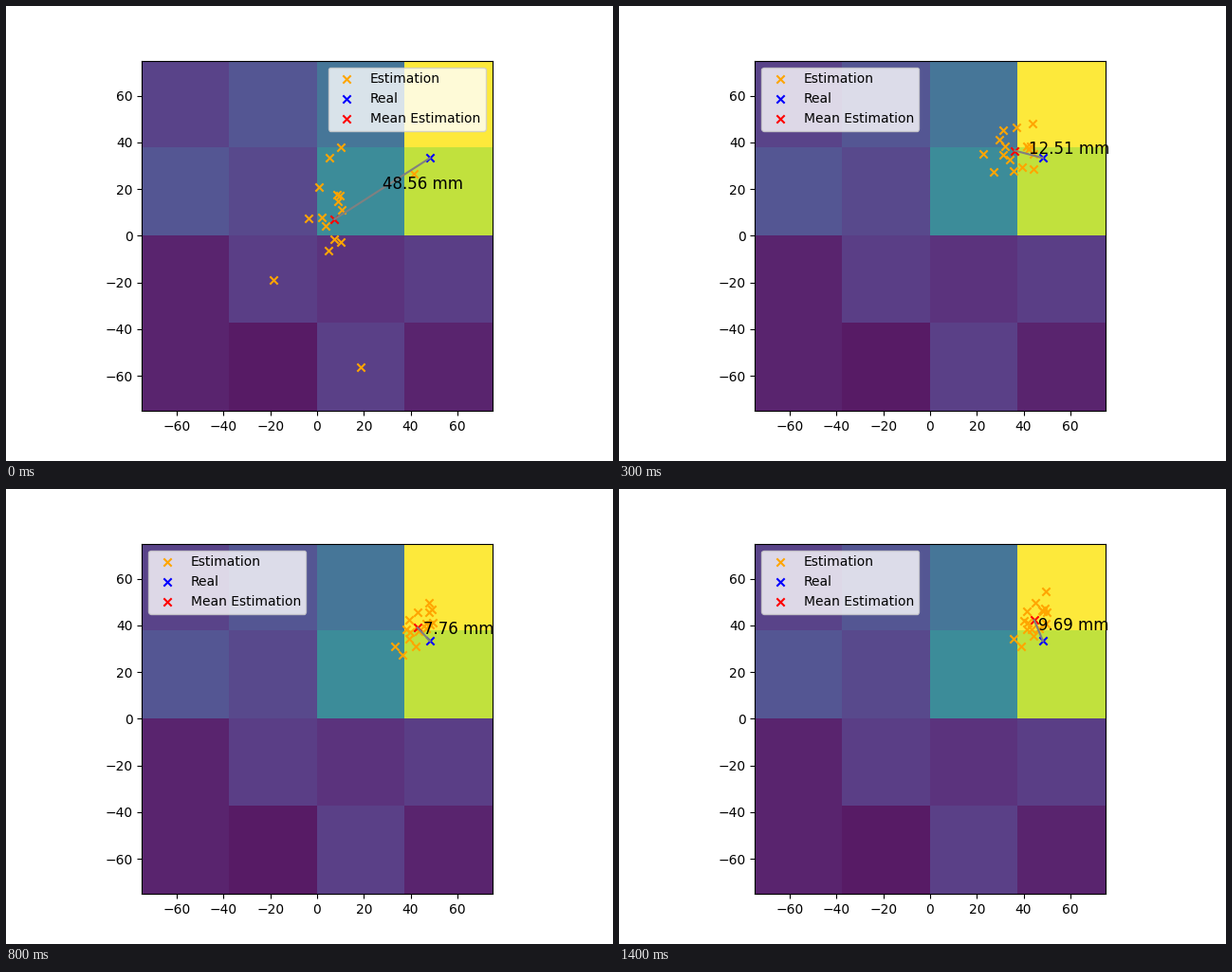
Recreate the animation shown at these times as a matplotlib script. Size 640 by 480 pixels, loop 1.5 s.

```python
import numpy as np
import matplotlib.pyplot as plt
from matplotlib.animation import FuncAnimation

FRAMES, INTERVAL = 15, 100
COUNT = 16                     # estimations per generation
HALF = 75                      # the plate spans -75..75 mm
REAL = np.array([48.3, 33.3])

# Key generations: frame, distance and angle of the mean from the real
# position, then spread in x and y and their correlation.
KEYS = np.array([
    (0, 48.56, 212.7, 4.2, 12.7, 0.15),
    (1, 27.88, 206.6, 14.3, 12.8, 0.64),
    (2, 19.65, 196.1, 6.5, 4.7, 0.76),
    (3, 12.51, 165.3, 6.5, 6.3, 0.09),
    (7, 7.21, 142.0, 4.5, 5.7, 0.57),
    (10, 8.85, 115.0, 4.2, 6.0, 0.74),
    (14, 9.69, 112.8, 4.2, 6.0, 0.65),
])
TIMES = KEYS[:, 0]

# Stray estimations that lie outside the main cluster.
SURVIVORS = [(2, 12.7), (16.2, 15.8), (-2, -2), (4.5, -0.2), (41.8, 19.6)]
STRAYS = {0: [(-18.7, -18.9), (18.7, -56.3), (41.4, 26.5)],
          1: SURVIVORS, 2: SURVIVORS}


def mean_at(dist, angle):
    a = np.radians(angle)
    return REAL + dist * np.array([np.cos(a), np.sin(a)])


def scatter_unit(n):
    """Random points with zero mean, unit spread and no correlation."""
    pts = np.random.default_rng(4).uniform(-1, 1, (n, 2))
    pts -= pts.mean(axis=0)
    root = np.linalg.cholesky(np.cov(pts.T, bias=True))
    return pts @ np.linalg.inv(root).T


def generation(frame, dist, angle, sx, sy, corr):
    strays = np.reshape(STRAYS.get(int(frame), []), (-1, 2))
    n = COUNT - len(strays)
    center = (COUNT * mean_at(dist, angle) - strays.sum(axis=0)) / n
    shape = np.linalg.cholesky([[sx**2, corr * sx * sy],
                                [corr * sx * sy, sy**2]])
    return np.vstack([strays, center + scatter_unit(n) @ shape.T])


clouds = [generation(*key) for key in KEYS]


def estimations(frame):
    """Replace the old estimations one after another by the next ones."""
    k = min(np.searchsorted(TIMES, frame, side="right") - 1, len(TIMES) - 2)
    part = (frame - TIMES[k]) / (TIMES[k + 1] - TIMES[k])
    renewed = (np.arange(COUNT) + 0.5) / COUNT < part
    return np.where(renewed[:, None], clouds[k + 1], clouds[k])


heat = [[0.13, 0.20, 0.33, 1.00],
        [0.20, 0.15, 0.43, 0.895],
        [0.03, 0.115, 0.075, 0.115],
        [0.03, 0.00, 0.12, 0.03]]

fig, ax = plt.subplots(figsize=(6.4, 4.8), dpi=100)
ax.imshow(heat, extent=(-HALF, HALF, -HALF, HALF), cmap="viridis",
          vmin=0, vmax=1, alpha=0.9, interpolation="nearest")
cloud = ax.scatter(*clouds[0].T, marker="x", c="orange", label="Estimation")
ax.scatter(*REAL, marker="x", c="blue", label="Real")
mean_mark = ax.scatter(0, 0, marker="x", c="red", label="Mean Estimation")
link, = ax.plot([], [], color="gray")
label = ax.text(0, 0, "", fontsize=12)
legend = ax.legend(loc="upper right")
ax.set_xlim(-HALF, HALF)
ax.set_ylim(-HALF, HALF)


def update(frame):
    dist, angle = (np.interp(frame, TIMES, KEYS[:, i]) for i in (1, 2))
    mean = mean_at(dist, angle)
    cloud.set_offsets(estimations(frame))
    mean_mark.set_offsets([mean])
    link.set_data(*zip(mean, REAL))
    label.set_position((mean + REAL) / 2)
    label.set_text(f"{dist:.2f} mm")
    legend.set_loc("upper right" if frame in (0, 2) else "upper left")
    return cloud, mean_mark, link, label, legend


anim = FuncAnimation(fig, update, frames=FRAMES, interval=INTERVAL,
                     repeat=True, repeat_delay=0)
plt.show()
```
